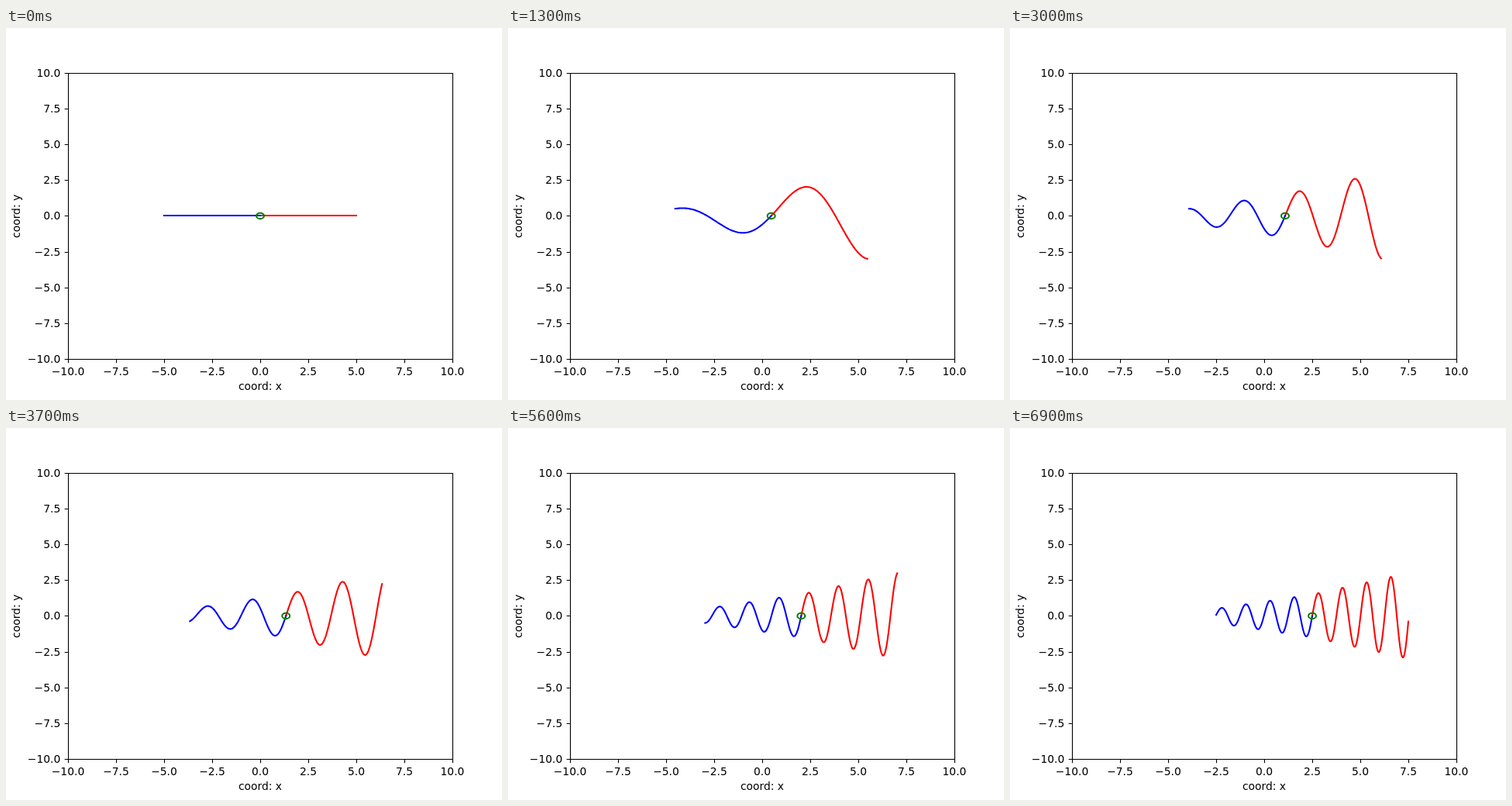
Animation, 640 px wide and 480 px high, one loop 7 s. Source, as an HTML page:

```html
<!DOCTYPE html>
<html lang="en">
<head>
<meta charset="utf-8">
<title>Travelling wave</title>
<style>
  html, body { margin: 0; width: 100%; height: 100%; overflow: hidden; background: #fff; }
  svg { display: block; width: 640px; height: 480px; }
  text { font: 13.89px "DejaVu Sans", sans-serif; text-anchor: middle; }
  .ylab { text-anchor: end; }
  #axes { fill: none; stroke: #000; stroke-width: 1.11; }
  .line { fill: none; stroke-width: 2.083; stroke-linecap: square; stroke-linejoin: round; }
</style>
</head>
<body>
<svg viewBox="0 0 640 480">
  <path id="red" class="line" stroke="#f00"/>
  <path id="blue" class="line" stroke="#00f"/>
  <ellipse id="ring" class="line" stroke="#008000" cy="242.4" rx="4.96" ry="3.7"/>
  <path id="axes"/>
  <g id="labels">
    <text x="328" y="467">coord: x</text>
    <text transform="translate(18 242.9) rotate(-90)">coord: y</text>
  </g>
</svg>
<script>
const FRAMES = 70, STEP = 100, SAMPLES = 150;
const $ = id => document.getElementById(id);
const px = x => 328 + 24.8 * x;
const py = y => 242.4 - 18.48 * y;
const snap = v => Math.floor(v + 0.5) + 0.5;

function addLabel(str, x, y, cls) {
  const el = document.createElementNS($('labels').namespaceURI, 'text');
  el.setAttribute('x', x);
  el.setAttribute('y', y);
  if (cls) el.setAttribute('class', cls);
  el.textContent = str;
  $('labels').append(el);
}

function drawAxes() {
  let d = 'M80.5 58.5H576.5V427.5H80.5Z';
  for (let v = -10; v <= 10; v += 2.5) {
    const x = snap(px(v)), y = snap(py(v));
    const str = v.toFixed(1).replace('-', '\u2212');
    d += `M${x} 427.5v4.86M80.5 ${y}h-4.86`;
    addLabel(str, px(v), 448);
    addLabel(str, 70.3, y + 4.5, 'ylab');
  }
  $('axes').setAttribute('d', d);
}

// Sine whose amplitude grows linearly away from the ring
function wave(from, slope, center, k) {
  if (!k) return `M${px(from)} 242H${px(from + 5)}`;
  const pts = [];
  for (let i = 0; i <= SAMPLES; i++) {
    const u = from + 5 * i / SAMPLES;
    const y = (1.5 + slope * u) * Math.sin(k * u);
    pts.push(px(center + u).toFixed(2) + ' ' + py(y).toFixed(2));
  }
  return 'M' + pts.join('L');
}

let shown = -1;
function tick() {
  const n = Math.floor(performance.now() / STEP) % FRAMES;
  if (n !== shown) {
    shown = n;
    const k = 5 * n / (FRAMES - 1), center = k / 2;
    $('blue').setAttribute('d', wave(-5, 0.2, center, k));
    $('red').setAttribute('d', wave(0, 0.3, center, k));
    $('ring').setAttribute('cx', px(center));
  }
  requestAnimationFrame(tick);
}

drawAxes();
tick();
</script>
</body>
</html>
```
